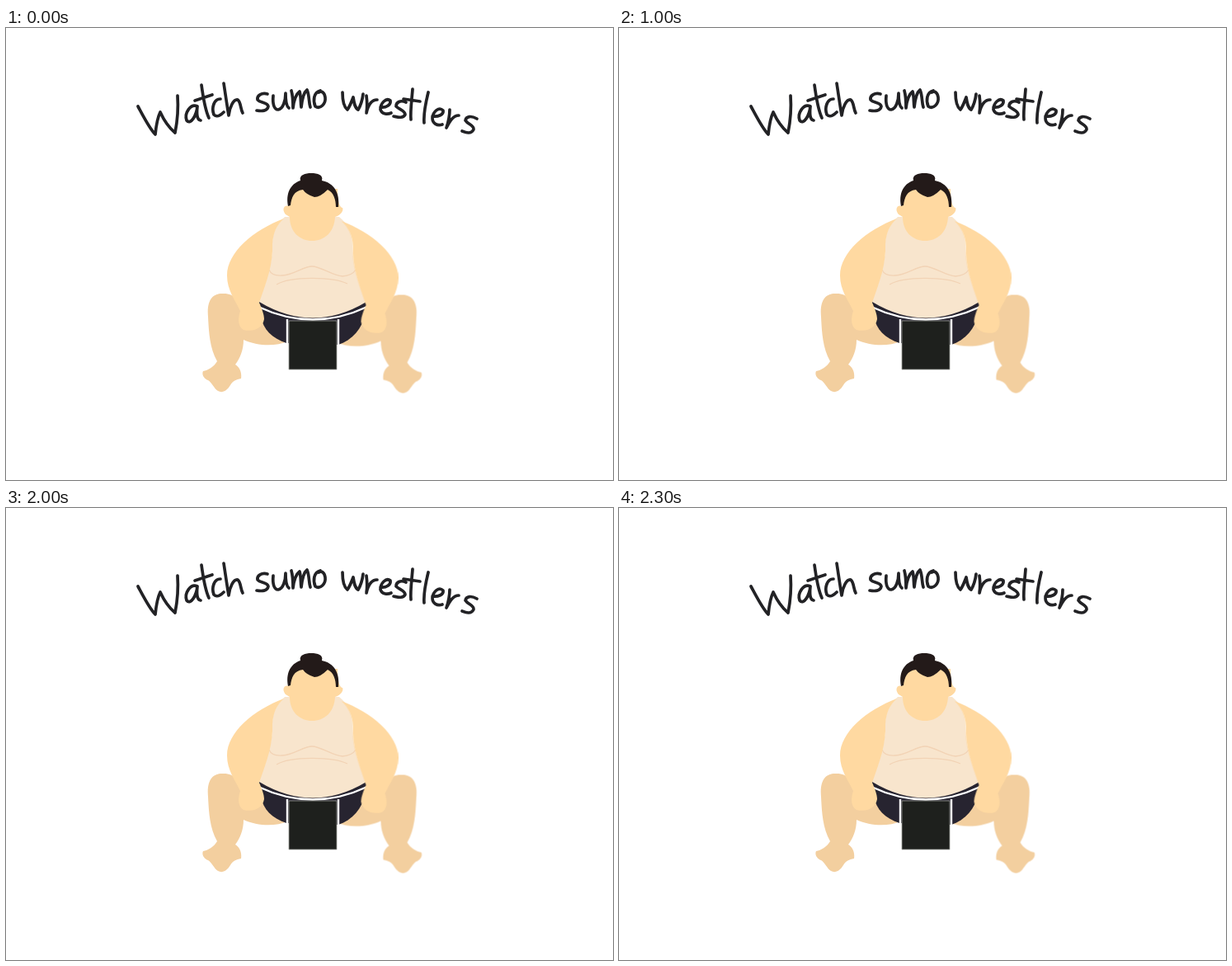
These frames come from a looping animation (736x548 px, 2800 ms). An HTML page:

```html
<!DOCTYPE html>
<html lang="en">
<head>
<meta charset="utf-8">
<title>Watch sumo wrestlers</title>
<style>
  html, body { margin: 0; width: 100%; height: 100%; overflow: hidden; background: #fff; }
  svg { display: block; width: 100%; height: 100%; }
  h1 { position: absolute; width: 1px; height: 1px; margin: 0; overflow: hidden; clip-path: inset(50%); font-family: Inter, sans-serif; }

  .lettering { fill: none; stroke: #222225; stroke-width: 3.7; stroke-linecap: round; stroke-linejoin: round; }
  .skin { fill: #ffd9a1; }
  .limb { fill: #f3cf9f; }
  .torso { fill: #f8e5cd; }
  .hair { fill: #231a19; }
  .belt { fill: #272430; }
  .apron { fill: #1e201d; }
  .trim { fill: none; stroke: #fff; stroke-width: 2.4; }
  .crease { fill: none; stroke: #f2d3b5; stroke-width: 1.3; }

  .wrestler, .body, .right-arm, .left-arm, .left-leg, .right-leg {
    transform-origin: 0 0;
    animation: 2.8s step-end infinite;
  }
  .wrestler { animation-name: thud; }
  .body { animation-name: sway; }
  .left-arm { animation-name: left-arm; }
  .right-arm { animation-name: right-arm; }
  .left-leg { animation-name: left-stomp; }
  .right-leg { animation-name: right-stomp; }

  /* Each stomp lasts 500 ms; the thud follows 200 ms after landing. */
  @keyframes thud {
    0%, 46.428%, 82.142% { transform: none; }
    42.857%, 78.571% { transform: translate(2px, 1px); }
  }
  @keyframes sway {
    0%, 35.714%, 71.428% { transform: none; }
    17.857% { transform: translate(382px, 303px) rotate(17deg) translate(-380px, -305px); }
    53.571% { transform: translate(356px, 303px) rotate(-17deg) translate(-363px, -305px); }
  }
  @keyframes left-arm {
    0%, 71.428% { transform: none; }
    53.571% { transform: translate(1px, -5px); }
  }
  @keyframes right-arm {
    0%, 35.714% { transform: none; }
    17.857% { transform: translate(1px, -5px); }
  }
  @keyframes left-stomp {
    0%, 35.714% { transform: none; }
    17.857% { transform: translate(247px, 344px) rotate(9deg) translate(-261px, -381px); }
  }
  @keyframes right-stomp {
    0%, 71.428% { transform: none; }
    53.571% { transform: translate(494px, 344px) rotate(-9deg) translate(-482px, -382px); }
  }
</style>
</head>
<body>
<h1>Watch sumo wrestlers</h1>
<svg viewBox="0 0 736 548" aria-hidden="true">
  <defs>
    <path id="leg" d="M245 350C243 328 252 321 264 322C278 322 284 332 285 345L342 360L341 380C328 386 305 386 288 378C288 390 284 400 278 408C284 412 286 418 285 425C279 426 275 428 272 433C268 440 262 443 257 440C252 437 250 430 245 427C240 425 237 420 239 416C245 415 252 411 256 404C247 388 246 370 245 350Z"/>
    <path id="arm" d="M337 231C300 245 268 272 268 300C268 318 278 330 284 343C281 352 281 362 288 366C300 369 311 364 313 353C313 347 310 340 307 333C317 305 324 285 323 262C324 248 328 239 337 231Z"/>
  </defs>

  <g class="lettering">
    <g>
      <path d="M160 95C167 108 174 122 181 129C182 119 184 108 187 102C192 113 199 122 205 127C208 112 209 96 208 82"/>
      <path d="M232 95C224 91 216 103 219 112C224 118 231 106 232 95C231 104 231 111 236 112"/>
      <path d="M237 69C239 84 241 98 246 109M229 88L250 81"/>
      <path d="M260 86C252 86 249 97 252 105C256 109 260 106 264 102"/>
      <path d="M264 67C266 80 268 94 270 106C271 96 276 86 281 87C285 90 284 98 287 103"/>
    </g>
    <g>
      <path d="M317 80C310 78 304 82 305 87C308 91 317 90 318 95C317 101 310 101 304 100"/>
      <path d="M324 82C323 92 325 99 330 99C336 98 339 88 339 79C339 88 340 95 343 97"/>
      <path d="M346 76C348 83 348 91 348 97C349 88 352 80 356 77C358 84 357 90 358 96C359 87 361 78 365 75C368 82 367 90 369 96"/>
      <path d="M381 76C373 78 372 88 375 95C381 99 388 92 387 84C386 78 383 76 379 78"/>
    </g>
    <g>
      <path d="M408 78C408 87 410 96 414 99C417 95 419 89 421 84C422 91 423 97 427 99C430 94 432 88 433 80"/>
      <path d="M437 82C438 90 438 97 437 103C439 94 443 87 450 87"/>
      <path d="M454 96C461 97 467 93 466 88C461 84 454 91 454 99C456 105 463 105 467 103"/>
      <path d="M485 90C478 87 473 90 473 95C477 99 484 100 484 105C481 110 475 108 470 107"/>
      <path d="M493 74C492 88 490 101 491 111M482 86L502 89"/>
      <path d="M512 78C509 90 506 103 507 115"/>
      <path d="M517 107C524 108 531 105 530 100C525 95 518 101 517 109C517 116 523 119 529 117"/>
      <path d="M538 99C538 107 536 115 534 121C538 113 542 106 549 106"/>
      <path d="M571 110C564 106 558 107 557 112C560 117 568 118 567 123C564 129 558 127 553 125"/>
    </g>
  </g>

  <g class="wrestler">
    <g class="limb">
      <g class="left-leg"><use href="#leg"/></g>
      <g class="right-leg"><use href="#leg" transform="translate(742.5 1.5) scale(-1 1)"/></g>
    </g>
    <g class="body">
      <path class="belt" d="M306 332L438 332L436 345C432 365 420 378 403 384L340 382C322 376 312 365 309 350Z"/>
      <path class="torso" d="M338 229C328 238 322 250 323 265C323 290 312 312 307 332Q372 371 437 332C428 310 421 292 420 265C420 248 414 237 404 229Z"/>
      <path class="trim" d="M306 338Q372 369 438 338"/>
      <path class="trim" d="M341 353V383M403 353V385"/>
      <path class="apron" d="M343 355H401V414H343Z" stroke="#9a9d99" stroke-width=".8"/>
      <path class="crease" d="M319 293Q322 301 335 300C350 299 360 289 371 289C382 289 395 300 408 301Q420 300 424 293M328 311C345 301 395 301 414 310"/>
      <g class="skin">
        <g class="left-arm"><use href="#arm"/></g>
        <g class="right-arm"><use href="#arm" transform="translate(743.5 3) scale(-1 1)"/></g>
        <path d="M344 195L343 216C337 214 334 220 339 226L344 229C344 248 357 258 371 258C386 258 398 248 399 229C404 228 410 222 408 218Q402 217 402 195Z"/>
      </g>
      <path class="hair" d="M342 216C339 202 344 189 357 185C355 178 363 176 370 176C378 176 385 178 383 185C398 188 405 200 403 217L400 217C400 208 397 199 390 196Q381 205 374 205Q364 202 360 196C349 197 346 206 345 215Z"/>
    </g>
  </g>
</svg>
</body>
</html>
```
